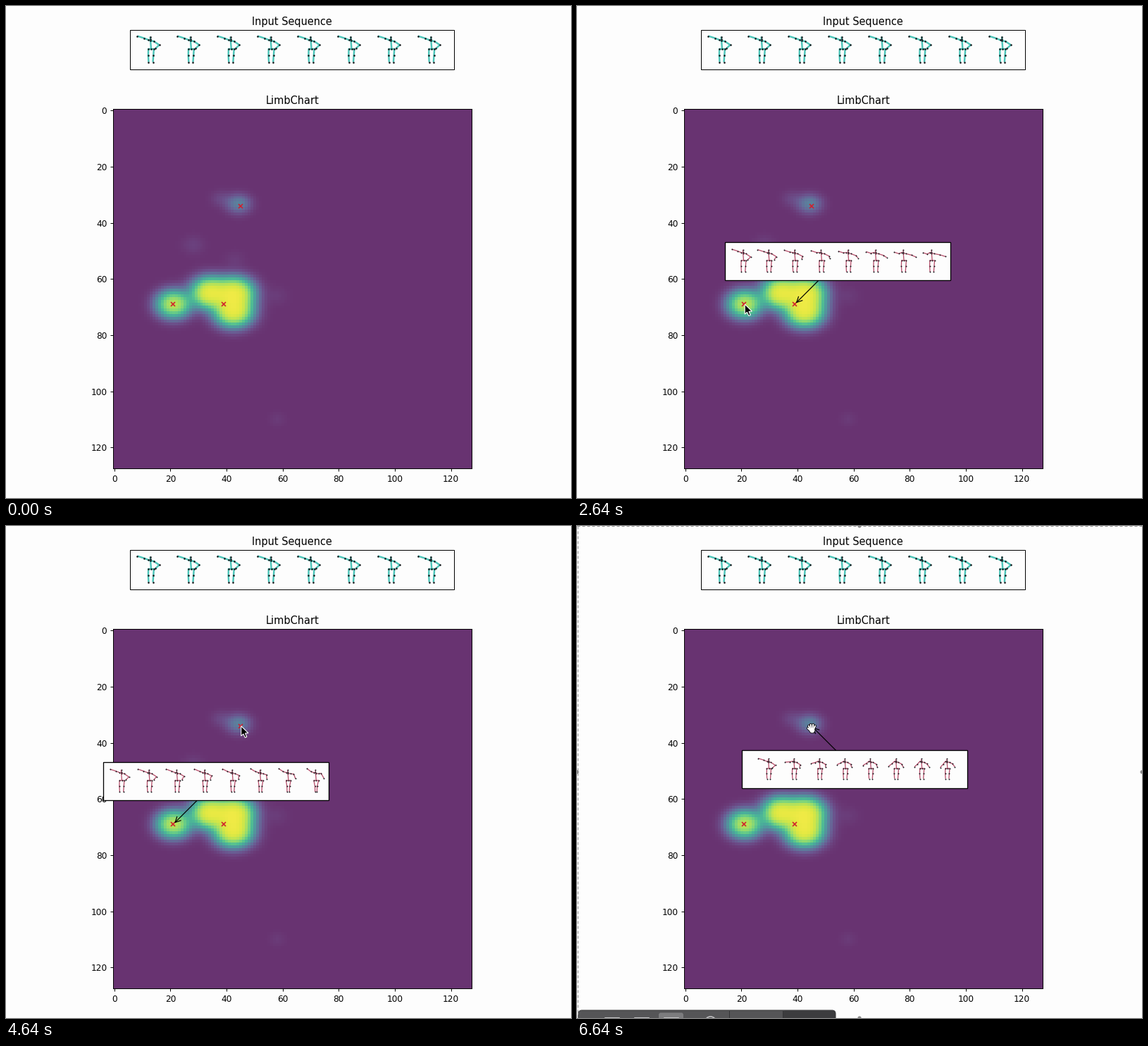
A matplotlib script that plays this animation: 802 by 698 pixels, repeating every 6.72 s.

```python
import numpy as np
import matplotlib.pyplot as plt
from matplotlib.animation import FuncAnimation
from matplotlib.collections import LineCollection
from matplotlib.colors import ListedColormap
from matplotlib.patches import Circle, FancyArrowPatch, FancyBboxPatch, Polygon, Rectangle

W, H, DPI = 802, 698, 87
FRAMES, STEP = 84, 80
PX = 72 / DPI  # points per pixel
PAPER = "#fdfdfd"
TEAL, ROSE = "#4cc5b9", "#b8506c"

plt.rcParams["font.family"] = "DejaVu Sans"
fig = plt.figure(figsize=((W + 0.01) / DPI, (H + 0.01) / DPI), dpi=DPI, facecolor=PAPER)

# Heat map: a sum of bumps that saturates towards 1
LEFT, TOP, SIDE, CELLS = 151.8, 146.45, 509.6, 128
BUMPS = [  # x, y, spread, strength
    (34, 65, 3.9, 3), (43, 65, 3.9, 3), (42.5, 71.5, 3.9, 3), (21, 69, 3.6, 2.1),
    (44.3, 33.3, 2.8, 0.38), (38, 31.5, 2.5, 0.07),
    (28, 48, 2.8, 0.05), (43, 53, 2.5, 0.03), (58, 66, 2.8, 0.03), (58, 110, 2, 0.03),
]
gx, gy = np.meshgrid(np.arange(CELLS), np.arange(CELLS))
energy = sum(a * np.exp(-(((gx - x) / s) ** 2 + ((gy - y) / (0.8 * s)) ** 2) / 2)
             for x, y, s, a in BUMPS)
pale = (0.8 * plt.get_cmap("viridis")(np.arange(256))[:, :3] + 0.2) * (0.99, 1, 0.957)

ax = fig.add_axes([LEFT / W, 1 - (TOP + SIDE) / H, SIDE / W, SIDE / H])
ax.imshow(1 - np.exp(-energy), cmap=ListedColormap(pale), vmin=0, vmax=1,
          interpolation="nearest", aspect="auto")
ax.set_title("LimbChart")
PEAKS = np.array([(39, 69), (21, 69), (45, 34)])
ax.plot(*PEAKS.T, "x", color="#d21e2c", ms=6 * PX, mew=1.6 * PX)
TIPS = (LEFT, TOP) + (PEAKS + 0.5) * SIDE / CELLS

# Overlay in pixel units, y down
top = fig.add_axes([0, 0, 1, 1])
top.set_xlim(0, W)
top.set_ylim(H, 0)
top.axis("off")


def box(x, y, w, h, z, lw=1.0):
    return top.add_patch(Rectangle((x, y), w, h, fc=PAPER, ec="black", lw=lw * PX, zorder=z))


# Skeletons: fixed torso, legs by stance, arms blend from START to an end pose
TORSO = np.array([(0, 0), (-3.4, 0), (3.4, 0), (-0.8, -10.3),
                  (-3.3, -11.2), (3.3, -9.5), (-1, -12.2), (-1, -15.2)])
LEGS = np.array([(-3.6, 8), (-3.1, 16.2), (2.8, 8), (2.2, 16.2)])
START = np.array([(-8.5, -13.3), (-17, -16), (10, -5), (5.3, -0.7)])  # elbow, hand per arm
CHAINS = [(9, 8, 1, 0, 2, 10, 11), (0, 3, 6, 7), (13, 12, 4, 3, 5, 14, 15)]


def people(end, xs, y, scale, color, lw, dot, z, ease=1, stance=1):
    lines, dots = [], []
    for u, x in zip(np.linspace(0, 1, len(xs)) ** ease, xs):
        legs = LEGS * (1 + (stance - 1) * u, 1)
        arms = START + (np.array(end) - START) * u
        body = np.vstack([TORSO, legs, arms]) * scale + (x, y)
        lines += [body[list(c)] for c in CHAINS]
        dots.append(body)
    bones = top.add_collection(LineCollection(lines, colors=color, linewidths=lw * PX, zorder=z))
    joints, = top.plot(*np.vstack(dots).T, "o", color="#15181c", ms=dot * PX, mew=0, zorder=z + 0.1)
    return [bones, joints]


EIGHT = np.arange(8)
box(176, 34, 460, 56, 1)
top.text(406, 26.6, "Input Sequence", ha="center", va="baseline", fontsize=12)
people(START, 206 + 56.9 * EIGHT, 61, 1.15, TEAL, 2.4, 2.6, 2)


def popup(tip, dy, end, xs, hip, scale, **style):
    mid = tip + (61, dy)
    arrow = top.add_patch(FancyArrowPatch(mid, tip, arrowstyle="->", mutation_scale=16,
                                          shrinkA=0, shrinkB=2, lw=1.2 * PX, color="black", zorder=3))
    frame = box(*np.round(mid - (160, 27)), 320, 54, 4, 1.3)
    return [arrow, frame] + people(end, xs, hip, scale, ROSE, 1.3, 1.9, 5, **style)


popups = [
    popup(TIPS[0], -61, [(-7, -9), (-13, -11), (11, -8), (19, -5.5)],
          236.5 + 36 * EIGHT + 0.32 * EIGHT ** 2, 361, 1),
    popup(TIPS[1], -61, [(-7.5, -12.5), (-13, -17), (7, -10), (11, -3)],
          164.5 + 39.4 * EIGHT, 361, 1, ease=1.4, stance=0.5),
    popup(TIPS[2], 61, [(-7, -6.5), (-11.5, -1.5), (7.5, -7.5), (11.5, -2.7)],
          272.5 + 36.2 * EIGHT, 344, 0.9, ease=0.45),
]
POPUP_AT = [1360, 2800, 4880, np.inf]

# Pointer: rises from below the stage, then visits each peak
ARROW = np.array([(0, 0), (0, 14), (3.2, 11.2), (5.6, 16.4), (8, 15.3), (5.8, 10.2), (10.2, 10)])
pointer = top.add_patch(Polygon(ARROW, fc="black", ec="white", lw=1.1 * PX, zorder=9))
ENTRY = np.array([330, 702])
MOVES = [(160, 880), (1920, 2480), (3200, 4160)]


def pointer_at(t):
    pos = ENTRY
    for (start, stop), tip in zip(MOVES, TIPS):
        u = np.clip((t - start) / (stop - start), 0, 1)
        pos = pos + (tip + (0.8, 0) - pos) * u * u * (3 - 2 * u)
    return pos


# Recorder controls with an open-hand pointer
CONTROLS_AT = 6240


def hand(x, y):
    parts = []
    for color, grow, z in (("black", 1.6, 9), ("white", 0, 9.5)):
        for a in np.radians(np.linspace(175, 40, 5)):
            dx, dy = 5.8 * np.cos(a), -6 * np.sin(a)
            parts += top.plot([x + dx, x + dx * 0.4], [y + dy, y + 2.5], color=color,
                              lw=(2.1 + grow) * PX, solid_capstyle="round", zorder=z)
        parts.append(top.add_patch(Circle((x + 0.3, y + 2.4), 3.6 + grow / 2, fc=color, lw=0, zorder=z)))
    return parts


def controls():
    parts = hand(333.5, 287.5)
    for xs, ys in (([0, W], [0.5, 0.5]), ([0.5, 0.5], [0, H]), ([W - 0.5] * 2, [0, H])):
        parts += top.plot(xs, ys, color="#979797", lw=PX, dashes=(4, 3), zorder=6)
    for x, y in ((W / 2, 0), (0, H / 2), (W, H / 2), (W / 2, H)):
        parts.append(top.add_patch(Circle((x, y), 2.6, fc="#8c8c8c", lw=0, zorder=7)))

    def slab(x, y, w, color, r, z, edge="none"):
        parts.append(top.add_patch(FancyBboxPatch(
            (x + r, y + r), w - 2 * r, 30, boxstyle=f"round,pad={r}",
            fc=color, ec=edge, lw=PX, zorder=z)))

    slab(2, 687, 365, "#555557", 5, 7, "#3a3a3c")
    slab(292, 687.5, 75, "#3c3c3e", 4, 7.1)
    slab(116, 690.5, 35, "#7c7c7e", 3, 7.2)
    for x in (39, 81, 123):
        slab(x, 697, 22, "#c4c4c6", 1, 7.3)
    parts.append(top.add_patch(Circle((189.5, 704), 8, fc="none", ec="#c4c4c6", lw=1.6 * PX, zorder=7.3)))
    for x in (216, 292):
        parts.extend(top.plot([x, x], [688, H], color="#353537", lw=PX, zorder=7.3))
    return parts


recorder = controls()


def show(parts, on):
    for p in parts:
        p.set_visible(on)


def draw(i):
    t = i * STEP
    for k, parts in enumerate(popups):
        show(parts, POPUP_AT[k] <= t < POPUP_AT[k + 1])
    recording = t >= CONTROLS_AT
    show(recorder, recording)
    pointer.set_visible(not recording)
    pointer.set_xy(ARROW + pointer_at(t))
    return []


anim = FuncAnimation(fig, draw, frames=FRAMES, interval=STEP, repeat=True, repeat_delay=0, blit=False)
plt.show()
```
